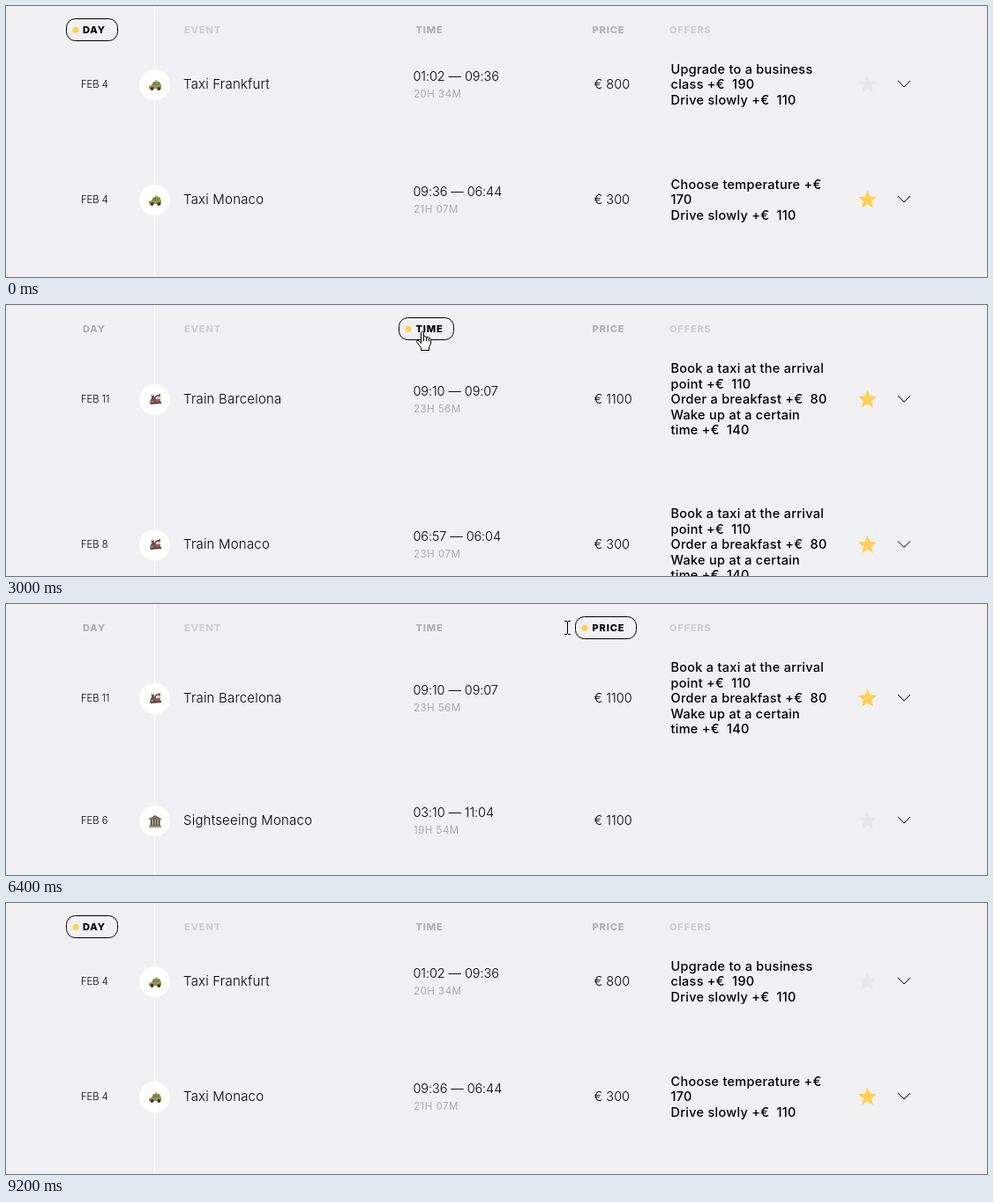
An HTML page with a canvas for the animation above (10 s loop, 1112 by 308 pixels).

```html
<!DOCTYPE html>
<html lang="en">
<head>
<meta charset="utf-8">
<title>Trip schedule sorting</title>
<style>
  html, body { margin: 0; width: 100%; height: 100%; overflow: hidden; background: #f1f1f3; }
  canvas { display: block; }
</style>
</head>
<body>
<canvas id="stage" width="1112" height="308"></canvas>
<script>
const LOOP = 10000;
const ctx = document.getElementById('stage').getContext('2d');
const YELLOW = '#ffd054', BLACK = '#000';
const STYLES = {
  head:  { font: '800 11px', gap: 0.85 },
  day:   { font: '300 11.2px', gap: 0 },
  title: { font: '300 15px', gap: 0.2 },
  time:  { font: '300 14.5px', gap: -0.1 },
  price: { font: '300 14.5px', gap: 0 },
  span:  { font: '400 11.5px', gap: 0.5 },
  offer: { font: '550 14.5px', gap: 0.27 }
};

const HEADS = [
  { name: 'DAY', x: 87, pill: [68.5, 58] },
  { name: 'EVENT', x: 202 },
  { name: 'TIME', x: 464.5, pill: [445.5, 62] },
  { name: 'PRICE', x: 664.5, pill: [645.5, 69] },
  { name: 'OFFERS', x: 752 }
];

const TRAIN_OFFERS = ['Book a taxi at the arrival', 'point +€  110', 'Order a breakfast +€  80',
  'Wake up at a certain', 'time +€  140'];
const SLOW = 'Drive slowly +€  110';
const row = (y, day, icon, title, time, span, price, star, offers) =>
  ({ y, day, icon, title, time, span, price, star, offers });
const barcelona = row(107, 'FEB 11', train, 'Train Barcelona', '09:10 — 09:07', '23H 56M', '€ 1100', true, TRAIN_OFFERS);

const LISTS = {
  DAY: [
    row(89, 'FEB 4', taxi, 'Taxi Frankfurt', '01:02 — 09:36', '20H 34M', '€ 800', false,
      ['Upgrade to a business', 'class +€  190', SLOW]),
    row(220, 'FEB 4', taxi, 'Taxi Monaco', '09:36 — 06:44', '21H 07M', '€ 300', true,
      ['Choose temperature +€', '170', SLOW])
  ],
  TIME: [
    barcelona,
    row(272.4, 'FEB 8', train, 'Train Monaco', '06:57 — 06:04', '23H 07M', '€ 300', true, TRAIN_OFFERS)
  ],
  PRICE: [
    barcelona,
    row(246, 'FEB 6', temple, 'Sightseeing Monaco', '03:10 — 11:04', '19H 54M', '€ 1100', false, [])
  ]
};

// Each entry holds from its start time until the next one.
const SORTS = [[0, 'DAY'], [3000, 'TIME'], [5600, 'PRICE'], [8000, 'DAY']];
const HOVERS = [[0, ''], [1800, 'TIME'], [4000, ''], [4200, 'PRICE'], [6400, ''], [7200, 'DAY'], [9000, '']];
const ICONS = [[0, true], [5600, false], [5800, true], [8000, false], [8200, true]];
const POINTER = [
  [0, null], [1000, beam, 362, 181], [1200, beam, 255, 102], [1400, beam, 250, 58],
  [1600, beam, 418, 43], [1800, hand, 458, 33], [2000, hand, 465, 30],
  [4000, beam, 542, 35], [4200, hand, 662, 18], [4400, hand, 671, 18],
  [6400, beam, 633, 19], [6600, beam, 379, 16], [6800, beam, 226, 19],
  [7000, hand, 120, 20], [7200, hand, 104, 22], [8800, hand, 122, 22],
  [9000, beam, 471, 174], [9200, null]
];
const at = (track, t) => track.filter(step => step[0] <= t).pop();

function text(str, x, y, style, color) {
  const { font, gap } = STYLES[style];
  ctx.font = font + ' Inter, "Open Sans", sans-serif';
  ctx.letterSpacing = gap + 'px';
  ctx.fillStyle = color;
  ctx.fillText(str, x, y);
}

function rect(color, x, y, w, h) {
  ctx.fillStyle = color;
  ctx.fillRect(x, y, w, h);
}

function disc(color, x, y, r) {
  ctx.fillStyle = color;
  ctx.beginPath();
  ctx.arc(x, y, r, 0, 2 * Math.PI);
  ctx.fill();
}

function trace(points, closed) {
  ctx.beginPath();
  points.forEach(([x, y]) => ctx.lineTo(x, y));
  if (closed) ctx.closePath();
}

function shape(color, points) {
  trace(points, true);
  ctx.fillStyle = color;
  ctx.fill();
}

function shifted(x, y, draw) {
  ctx.save();
  ctx.translate(x, y);
  draw();
  ctx.restore();
}

function taxi() {
  shape('#a3923f', [[3, 5], [5, 1], [12, 1], [14, 5], [14, 9], [0, 9], [0, 6]]);
  shape('#4d8585', [[4, 5], [6, 2], [8, 2], [8, 5]]);
  rect('#5f8f86', 9, 2, 3, 3);
  rect('#d5a52f', 7, -0.5, 3, 1.5);
  rect('#c98a35', 0, 6, 3, 1.5);
  disc('#373737', 3.5, 9, 2);
  disc('#373737', 11.3, 9, 2);
}

function train() {
  rect('#d8d2cf', 2, 1, 4, 3);
  rect('#5b5a5d', 3, 3, 3, 4);
  shape('#6a5a5a', [[2, 7], [8, 4], [8, 11], [1, 11]]);
  shape('#8c5650', [[7, 3], [13, 1], [13, 4], [7, 5]]);
  rect('#dcc8c3', 9, 4, 4, 3);
  rect('#b5544a', 8, 7, 5, 4);
  rect('#cf7a55', 1, 9, 4, 2);
  shape('#46454a', [[1, 11], [14, 10], [14, 12], [2, 13]]);
}

function temple() {
  shape('#77715f', [[7, 0], [14, 4], [14, 5], [0, 5], [0, 4]]);
  rect('#b9b3a2', 1.5, 5, 11, 6);
  [2, 5, 8, 11].forEach(x => rect('#4f4a40', x, 5, 1.5, 6));
  rect('#69624f', 1, 11, 12, 1.5);
  rect('#8b8574', 0, 12.5, 14, 1.5);
}

function star(x, y, on) {
  const points = Array.from({ length: 10 }, (_, i) => {
    const r = i % 2 ? 4.9 : 11, a = (i / 5 - 0.5) * Math.PI;
    return [x + r * Math.cos(a), y + r * Math.sin(a)];
  });
  shape(on ? YELLOW : '#e9e9ea', points);
}

function beam() {
  rect('#000', 3, 1, 1, 14);
  [0, 15].forEach(y => {
    rect('#000', 0, y, 3, 1);
    rect('#000', 4, y, 3, 1);
  });
}

function hand() {
  trace([[5.5, 13.5], [5.5, 1.5], [6.5, 0.5], [7.5, 0.5], [8.5, 1.5], [8.5, 5.5], [10.5, 5.5],
    [11.5, 6.5], [13.5, 6.5], [14.5, 7.5], [15.5, 7.5], [16.5, 8.5], [16.5, 14], [14.5, 18],
    [14.5, 21.5], [5.5, 21.5], [5.5, 18.5], [3.5, 16], [0.5, 11.8], [1, 10.5], [3, 10.5]], true);
  ctx.fillStyle = '#fff';
  ctx.fill();
  ctx.strokeStyle = '#000';
  ctx.lineWidth = 1;
  ctx.stroke();
  [8, 11, 14].forEach((x, i) => rect('#000', x, 6 + i / 2, 1, 5 - i / 2));
}

function drawHead({ name, x, pill }, sort, hover) {
  const active = name === sort;
  if (active) {
    ctx.beginPath();
    ctx.roundRect(pill[0], 14.5, pill[1], 25, 10);
    ctx.strokeStyle = BLACK;
    ctx.lineWidth = 1;
    ctx.stroke();
    disc(YELLOW, pill[0] + 10.5, 27.3, 3.5);
  }
  const idle = pill ? '#b1b1b3' : '#d0d0d1';
  text(name, x, 31, 'head', active || name === hover ? BLACK : idle);
}

function drawRow(item, icons) {
  const { y } = item;
  disc('#fffffd', 168.5, y + 0.6, 17.5);
  if (icons) shifted(162, Math.round(y) - (item.icon === taxi ? 4 : 7) + (item.icon === temple ? 1 : 0), item.icon);
  text(item.day, 85, y + 4, 'day', BLACK);
  text(item.title, 201, y + 5, 'title', BLACK);
  text(item.time, 461.5, y - 4, 'time', BLACK);
  text(item.span, 462, y + 15, 'span', '#ababad');
  text(item.price, 666.5, y + 5, 'price', BLACK);
  item.offers.forEach((line, i) =>
    text(line, 753.5, y + 5 + (i - (item.offers.length - 1) / 2) * 17.5, 'offer', BLACK));
  star(976.5, y + 0.5, item.star);
  trace([[1011, y - 4], [1018, y + 3], [1025, y - 4]]);
  ctx.strokeStyle = BLACK;
  ctx.lineWidth = 1;
  ctx.stroke();
}

function draw(t) {
  const sort = at(SORTS, t)[1], hover = at(HOVERS, t)[1], icons = at(ICONS, t)[1];
  const [, cursor, x, y] = at(POINTER, t);
  rect('#f1f1f3', 0, 0, 1112, 308);
  rect('#fbfbfc', 168, 0, 1, 308);
  HEADS.forEach(head => drawHead(head, sort, hover));
  LISTS[sort].forEach(item => drawRow(item, icons));
  if (cursor) shifted(x, y, cursor);
}

const start = performance.now();
function tick() {
  draw((performance.now() - start) % LOOP);
  requestAnimationFrame(tick);
}
tick();
</script>
</body>
</html>
```
